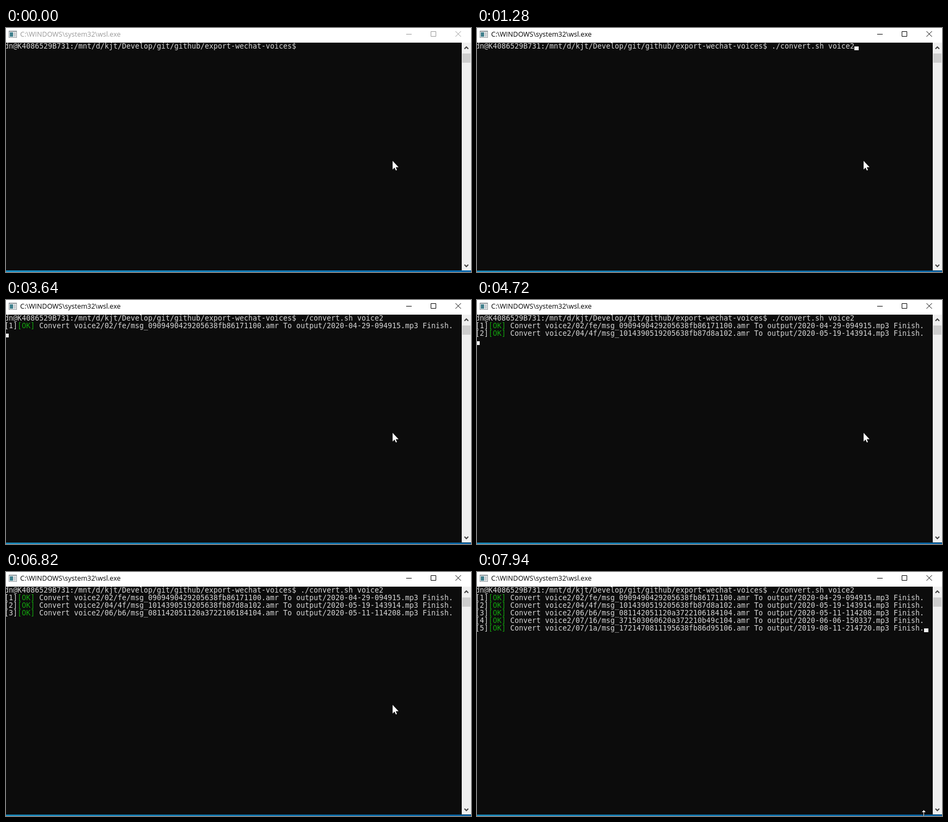
Animation of 854x450 px, one loop 8 s. Source, as an HTML page:

```html
<!DOCTYPE html>
<html lang="en">
<head>
<meta charset="utf-8">
<title>Terminal</title>
<style>
html, body { margin: 0; width: 100%; height: 100%; overflow: hidden; background: #0c0c0c; }
svg { display: block; width: 854px; height: 450px; }
#title { font: 12.5px "Open Sans", "Noto Sans", sans-serif; }
#rows { font: 13.3px "DejaVu Sans Mono", "Noto Sans Mono", monospace; fill: #d6d6d6; }
</style>
</head>
<body>
<svg viewBox="0 0 854 450" xmlns="http://www.w3.org/2000/svg">
  <defs>
    <linearGradient id="desk">
      <stop offset="0" stop-color="#1b90c4"/>
      <stop offset="1" stop-color="#0769ad"/>
    </linearGradient>
  </defs>
  <rect width="854" height="450" fill="#0c0c0c"/>
  <rect width="854" height="27" fill="#fff"/>

  <g shape-rendering="crispEdges">
    <rect x="5" y="5" width="15" height="13" fill="#8e979c"/>
    <rect x="6" y="7" width="13" height="10" fill="#f1f3f3"/>
    <rect x="7" y="8" width="6" height="8" fill="#3f7f8c"/>
    <rect x="14" y="8" width="4" height="8" fill="#c8cdd0"/>
  </g>
  <text id="title" x="26" y="16">C:\WINDOWS\system32\wsl.exe</text>
  <path id="buttons" fill="none" d="M735 11.5h10M780.5 6.5h9v9h-9zM825.5 6l10 10M835.5 6l-10 10"/>

  <g id="rows"></g>
  <rect id="caret" width="8" height="7" fill="#f3f3f3"/>

  <rect x="837" y="27" width="17" height="420" fill="#f0f0f0"/>
  <rect x="838" y="47" width="15" height="17" fill="#cdcdcd"/>
  <path d="M842 38.5l3.5 -3.5l3.5 3.5M842 436.5l3.5 3.5l3.5 -3.5" fill="none" stroke="#404040" stroke-width="2"/>

  <rect y="447" width="854" height="3" fill="url(#desk)"/>
  <rect id="edge" y="447" width="854" height="1" fill="#0c0c0c"/>
  <path id="arrow" d="M0 0V16L3.6 12.5L6 17.8L8 16.9L5.8 11.8H11Z" fill="#fff" stroke="#000" stroke-width="1" paint-order="stroke"/>
  <path id="resize" d="M820.5 439l3.5 4h-3v7h-1v-7h-3z" fill="#fff" stroke="#000" stroke-width="1" paint-order="stroke"/>
</svg>
<script>
const LOOP = 8000, LEFT = -3, TOP = 27, CELL = 8, LINE = 14;
const $ = id => document.getElementById(id);
const show = (el, on) => el.setAttribute("visibility", on ? "visible" : "hidden");

const PROMPT = "dn@K4086529B731:/mnt/d/kjt/Develop/git/github/export-wechat-voices$";
const COMMAND = "./convert.sh voice2";

// [time, input, output]
const JOBS = [
  [3640, "02/fe/msg_0909490429205638fb86171100", "2020-04-29-094915"],
  [4720, "04/4f/msg_1014390519205638fb87d8a102", "2020-05-19-143914"],
  [5810, "06/b6/msg_081142051120a3722106184104", "2020-05-11-114208"],
  [6910, "07/16/msg_371503060620a372210b49c104", "2020-06-06-150337"],
  [7940, "07/1a/msg_1721470811195638fb86d95106", "2019-08-11-214720"]
];

// [time, column, row]; without a column the caret is hidden
const CARET = [
  [0], [580, 68, 0], [970], [1280, 87, 0], [2080, 0, 1], [3090],
  [3640, 0, 2], [4190], [4720, 0, 3], [5750], [5810, 0, 4], [6820],
  [6910, 0, 5], [7940, 103, 5]
];

// [time, x, y] of the pointer tip
const POINTER = [
  [0, 710, 245], [7380, 713, 263], [7450, 722, 306], [7530, 735, 350],
  [7630, 757, 389], [7700, 777, 412], [7780, 797, 429], [7860, 812, 439]
];

const latest = (steps, t) => steps.filter(s => s[0] <= t).pop();

// Places every character on the terminal grid.
function put(col, row, str, start, color) {
  const el = document.createElementNS("http://www.w3.org/2000/svg", "text");
  el.setAttribute("x", [...str].map((c, i) => LEFT + (col + i) * CELL).join(" "));
  el.setAttribute("y", TOP + row * LINE + 11);
  if (color) el.setAttribute("fill", color);
  el.textContent = str;
  $("rows").append(el);
  return { el, start };
}

const parts = [put(0, 0, PROMPT, 0), put(68, 0, COMMAND, 1280)];
JOBS.forEach(([start, input, output], i) => parts.push(
  put(0, i + 1, `[${i + 1}]`, start),
  put(3, i + 1, "[OK]", start, "#13a10e"),
  put(8, i + 1, `Convert voice2/${input}.amr To output/${output}.mp3 Finish.`, start)
));

function draw(t) {
  const active = t >= 500;
  $("title").setAttribute("fill", active ? "#000" : "#999");
  $("buttons").setAttribute("stroke", active ? "#000" : "#999");
  $("edge").setAttribute("opacity", active ? 0.45 : 0);

  parts.forEach(p => show(p.el, t >= p.start));

  const [, col, row] = latest(CARET, t);
  show($("caret"), col !== undefined);
  if (col !== undefined) {
    $("caret").setAttribute("x", LEFT + col * CELL);
    $("caret").setAttribute("y", TOP + row * LINE + 7);
  }

  const [, x, y] = latest(POINTER, t);
  const resizing = t >= 7940;
  $("arrow").setAttribute("transform", `translate(${x} ${y})`);
  show($("arrow"), !resizing);
  show($("resize"), resizing);
}

const begin = performance.now();
function tick() {
  draw((performance.now() - begin) % LOOP);
  requestAnimationFrame(tick);
}
tick();
</script>
</body>
</html>
```
